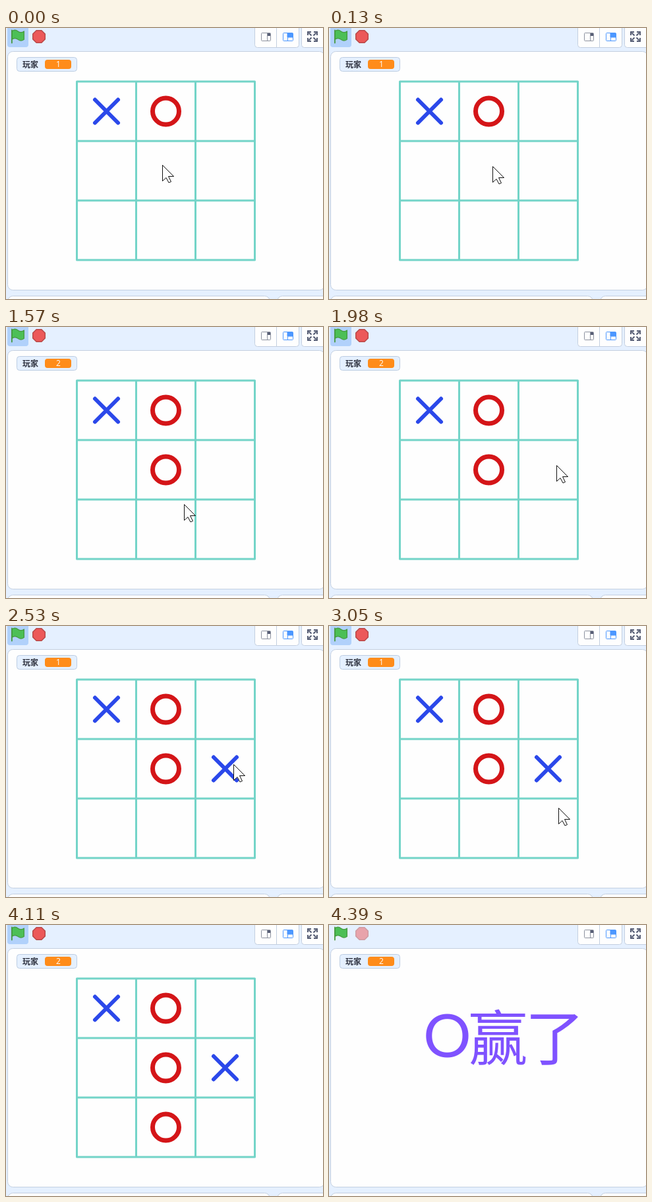
Write an HTML page that moves like this. It is 481 by 410 pixels and loops after 6.23 s.

```html
<!DOCTYPE html>
<html lang="zh">
<head>
<meta charset="utf-8">
<style>
html, body { margin: 0; width: 100%; height: 100%; overflow: hidden; background: #e5f0ff; }
svg { display: block; font-family: "Noto Sans CJK SC", "Noto Sans CJK", "Noto Sans SC", sans-serif; }
.panel { fill: #fefefe; stroke: #c3cfe0; }
.x { fill: none; stroke: #2b48ea; stroke-width: 6; stroke-linecap: round; }
.o { fill: none; stroke: #d41518; stroke-width: 7; }
</style>
</head>
<body>
<svg width="481" height="410" viewBox="0 0 481 410">
  <defs>
    <path id="x" class="x" d="M-17.5-17.5l35 35m0-35l-35 35"/>
    <circle id="o" class="o" r="20"/>
    <path id="corner" d="M2.5 2.5l4 4M1 6V1h5" fill="none" stroke="#575e75" stroke-width="2"/>
  </defs>

  <rect id="active" x="2" y="-6" width="32" height="35" rx="4" fill="#b1d1fb"/>
  <g transform="translate(8 2.5) scale(1.2)" fill="#4cbf56" stroke="#45993d" stroke-linecap="round" stroke-linejoin="round">
    <path d="M.75 2A6.44 6.44 0 0 1 8.44 2a6.44 6.44 0 0 0 7.69 0v10.4a6.44 6.44 0 0 1-7.69 0a6.44 6.44 0 0 0-7.69 0"/>
    <path d="M.75 16.75v-16" stroke-width="1.5"/>
  </g>
  <path id="stop" transform="translate(40 3) scale(1.43)" fill="#ec5959" stroke="#b84848"
    d="M4.3.5h5.4l3.8 3.8v5.4l-3.8 3.8H4.3L.5 9.7V4.3z"/>

  <rect class="panel" x="377.500" y="-6.5" width="67" height="36" rx="4"/>
  <path d="M410.500 0v29" stroke="#c3cfe0"/>
  <rect class="panel" x="448.500" y="-6.5" width="40" height="36" rx="4"/>
  <g fill="none" stroke="#8d929f">
    <rect x="387.500" y="7.500" width="14" height="12" rx="1"/>
    <path d="M396.500 8v11"/>
    <path d="M397 8h4v4h-4z" fill="#575e75" stroke="none"/>
  </g>
  <g fill="none" stroke="#4c97ff">
    <rect x="420.500" y="7.500" width="15" height="12" rx="1"/>
    <path d="M427 8h8v6h-8z" fill="#4c97ff"/>
    <path d="M427.500 14v5"/>
  </g>
  <g transform="translate(465 13)">
    <use href="#corner" x="-8" y="-8"/>
    <use href="#corner" x="-8" y="-8" transform="rotate(90)"/>
    <use href="#corner" x="-8" y="-8" transform="rotate(180)"/>
    <use href="#corner" x="-8" y="-8" transform="rotate(270)"/>
  </g>

  <rect class="panel" x="2.500" y="35.500" width="481" height="361" rx="8"/>
  <rect class="panel" x="2.500" y="405.500" width="398" height="30" rx="8"/>
  <rect class="panel" x="411.500" y="405.500" width="90" height="30" rx="8"/>

  <rect x="16.500" y="44.500" width="91" height="21" rx="4" fill="#e5f0ff" stroke="#bccde2"/>
  <text x="25" y="59.500" font-size="12" font-weight="700" fill="#2f3340">玩家</text>
  <rect x="59" y="48" width="40" height="14" rx="4" fill="#ff8c1a"/>
  <text id="player" x="79.500" y="59.300" font-size="12" text-anchor="middle" fill="#fff" style="font-family:'Open Sans',sans-serif"></text>

  <g id="board">
    <path d="M107.500 81h270v270h-270zm90 0v270m90-270v270m-180-180h270m-270 90h270"
      fill="none" stroke="#73d4c8" stroke-width="3" stroke-linejoin="round"/>
    <g id="marks"></g>
    <path id="cursor" d="M.5.5v24l5.500-5 4 7.500 3.500-1.500-4-8h8z" fill="#fff" stroke="#111"/>
  </g>
  <g id="win" fill="#7f52ff">
    <text x="143" y="200" font-size="91" style="font-family:Lato,sans-serif">O</text>
    <text x="211.500" y="204" font-size="90" letter-spacing="-4">赢了</text>
  </g>
</svg>
<script>
const LOOP = 6230, WIN = 4390;
// time, tip x, tip y
const moves = [
  [0, 237, 207], [130, 248, 209], [1020, 200, 212], [1140, 160, 214],
  [1570, 270, 268], [1700, 362, 295], [1850, 356, 246], [1980, 345, 209],
  [2900, 357, 233], [3050, 348, 275], [3180, 337, 288],
  [3320, 312, 303], [3450, 266, 319], [3570, 247, 317], [3720, 234, 305]
];
// time, mark, column, row
const turns = [[0, "x", 0, 0], [0, "o", 1, 0], [740, "o", 1, 1], [2530, "x", 2, 1], [3840, "o", 1, 2]];

const el = id => document.getElementById(id);
const show = (node, on) => node.style.display = on ? "" : "none";

el("marks").innerHTML = turns.map(([, mark, col, row]) =>
  `<use href="#${mark}" x="${152.5 + 90 * col}" y="${126 + 90 * row}"/>`).join("");
const marks = [...el("marks").children];

function draw(now) {
  const t = now % LOOP, won = t >= WIN;
  const past = turns.filter(turn => turn[0] <= t);
  const [, x, y] = moves.filter(move => move[0] <= t).pop();
  marks.forEach((mark, i) => show(mark, i < past.length));
  el("player").textContent = past.at(-1)[1] === "o" && t >= 740 ? 2 : 1;
  el("cursor").setAttribute("transform", `translate(${x} ${y})`);
  show(el("cursor"), t < 4110);
  show(el("board"), !won);
  show(el("active"), !won);
  show(el("win"), won);
  el("stop").setAttribute("opacity", won ? .5 : 1);
}

const start = performance.now();
function tick() {
  draw(performance.now() - start);
  requestAnimationFrame(tick);
}
tick();
</script>
</body>
</html>
```
